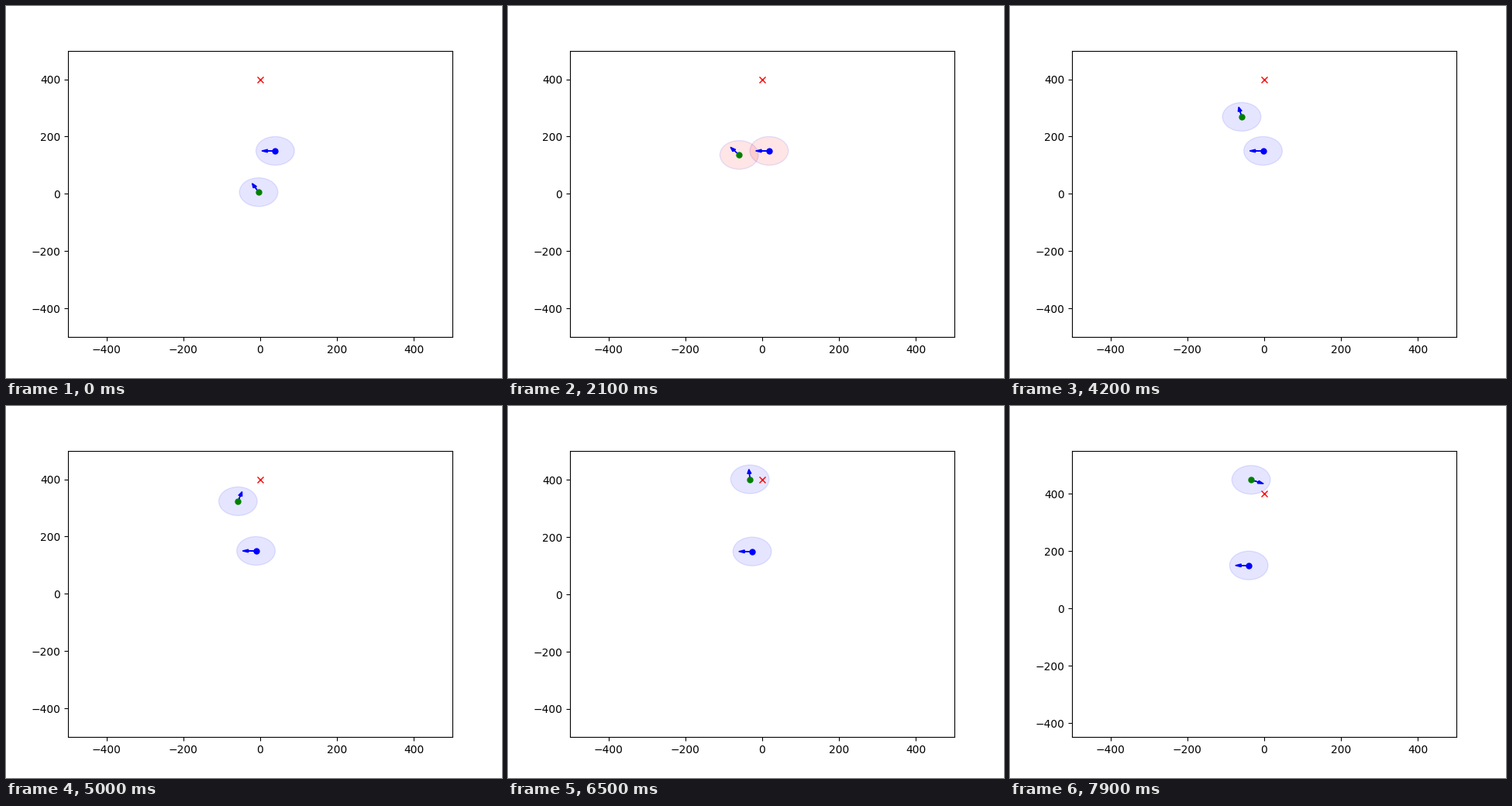
A matplotlib script for the animation above (8 s loop, 640 by 480 pixels).

```python
import numpy as np
import matplotlib.pyplot as plt
from matplotlib.animation import FuncAnimation
from matplotlib.patches import Circle

FRAMES = 80
SPEED = 7        # robot units per step
RADIUS = 50      # safety zone
REACH = 20       # arrow shaft length
MARGIN = 100     # space kept above the robot

# step, x, y, heading in degrees at each turn of the route
TURNS = np.array([
    (0, -4, 6, 119),
    (21, -60, 136, 130),
    (32, -86, 206, 88),
    (42, -58.5, 269, 103),
    (58, -30, 369, 42),
    (71, -64, 430, 139),
    (79, -34, 449, -23),
])
STEPS, XS, YS, HEADINGS = TURNS.T


def robot(step):
    """Position and heading on a Hermite curve between turns."""
    k = min(np.searchsorted(STEPS, step, side="right"), len(STEPS) - 1) - 1
    span = STEPS[k + 1] - STEPS[k]
    u = (step - STEPS[k]) / span
    a, b = np.radians(HEADINGS[k:k + 2])
    ease = u * u * (3 - 2 * u)
    leave = SPEED * span * u * (1 - u)**2
    arrive = SPEED * span * u * u * (u - 1)
    x = XS[k] + ease * (XS[k + 1] - XS[k]) + leave * np.cos(a) + arrive * np.cos(b)
    y = YS[k] + ease * (YS[k + 1] - YS[k]) + leave * np.sin(a) + arrive * np.sin(b)
    return x, y, a + (b - a) * u


PATH = [robot(i) for i in range(FRAMES)]
TOPS = np.maximum.accumulate([max(500, y + MARGIN) for _, y, _ in PATH])

fig, ax = plt.subplots(figsize=(6.4, 4.8), dpi=100)
ax.set_xlim(-500, 500)
ax.plot(0, 400, "rx")


class Agent:
    def __init__(self, color):
        self.zone = ax.add_patch(Circle((0, 0), RADIUS, ec="b", alpha=0.1))
        self.arrow = ax.arrow(0, 0, REACH, 0, head_width=10, head_length=15,
                              color="b")
        self.dot, = ax.plot([0], [0], "o", color=color, markersize=5)

    def place(self, x, y, angle, close):
        self.zone.center = x, y
        self.zone.set_facecolor("r" if close else "b")
        self.arrow.set_data(x=x, y=y, dx=REACH * np.cos(angle),
                            dy=REACH * np.sin(angle))
        self.dot.set_data([x], [y])


mover = Agent("g")
obstacle = Agent("b")


def update(i):
    x, y, angle = PATH[i]
    ox, oy = 39 - i, 150
    close = np.hypot(x - ox, y - oy) < 2 * RADIUS
    mover.place(x, y, angle, close)
    obstacle.place(ox, oy, np.pi, close)
    ax.set_ylim(TOPS[i] - 1000, TOPS[i])
    return []


anim = FuncAnimation(fig, update, frames=FRAMES, interval=100, repeat=True,
                     repeat_delay=0, init_func=lambda: update(0))
plt.show()
```
